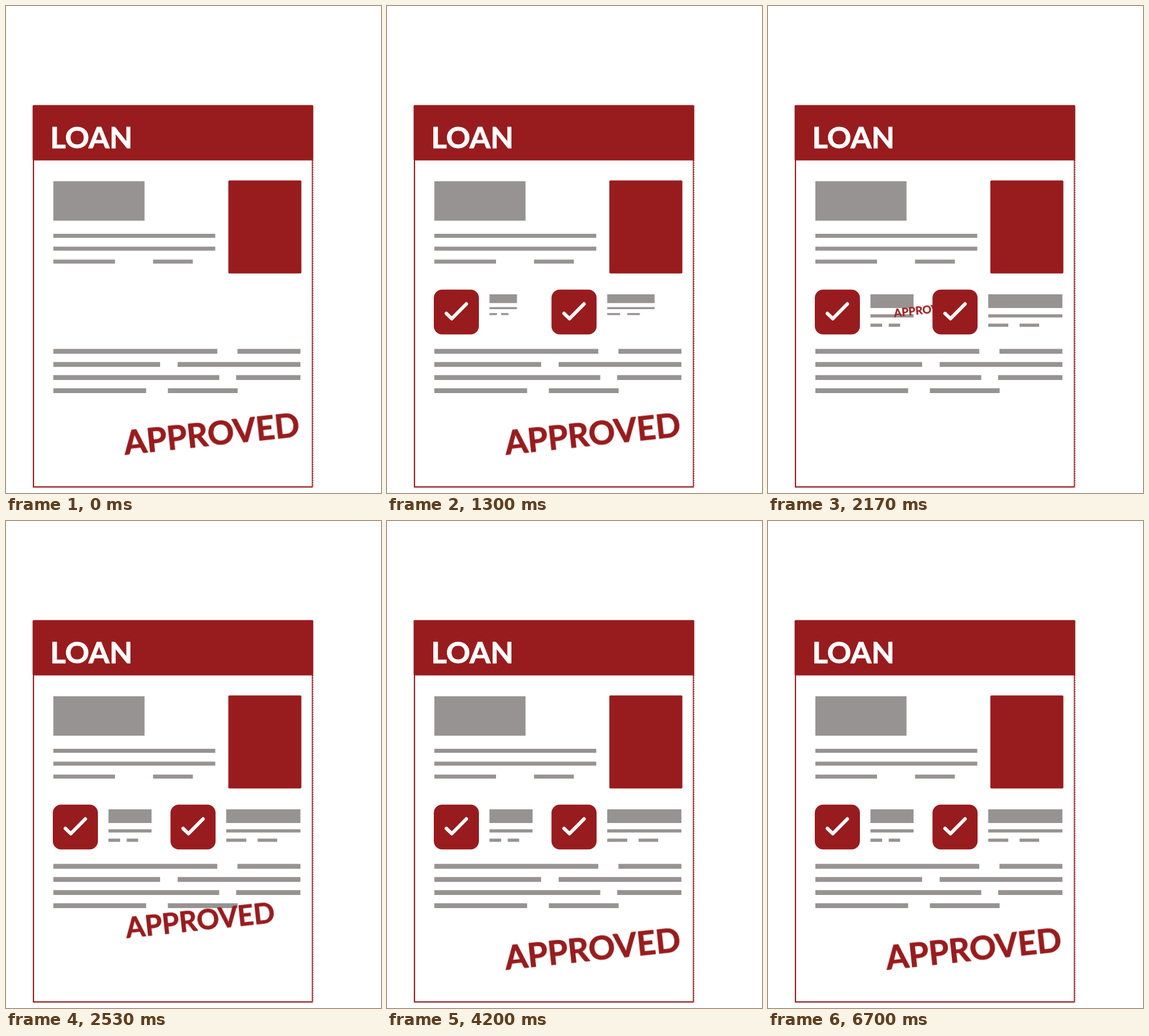
An HTML page that plays this animation: 657 px wide and 853 px high, repeating every 8 s.

```html
<!DOCTYPE html>
<html lang="en">
<head>
<meta charset="utf-8">
<title>Loan approved</title>
<style>
  html, body { margin: 0; width: 100%; height: 100%; overflow: hidden; background: #fff; }
  svg { display: block; width: 100vw; height: 100vh; }
  .red { fill: #981c1e; }
  .grey { fill: #979392; }
  .edge { fill: none; stroke: #981c1e; }
  .tick { fill: none; stroke: #fff; stroke-width: 6; stroke-linecap: round; stroke-linejoin: round; }
  text { font-family: Lato, Carlito, sans-serif; font-weight: 700; stroke-width: 1; stroke-linejoin: round; }
  #title { fill: #fff; stroke: #fff; font-size: 52.5px; }
  #stamp text { fill: #981c1e; stroke: #981c1e; font-size: 57.5px; }
  .pop, #stamp { transform-box: view-box; }
</style>
</head>
<body>
<svg viewBox="0 0 657 853" preserveAspectRatio="none">
  <path class="edge" stroke-width="2.2" d="M48.1 268V842.3H537"/>
  <path class="edge" stroke-width="1.6" d="M536.6 268V843"/>
  <path class="edge" stroke-width="1.2" stroke-dasharray="2 2" d="M538 270V843"/>
  <rect class="red" x="46.6" y="173.5" width="491.8" height="97" rx="2"/>
  <text id="title" x="77.6" y="249">LOAN</text>
  <rect class="red" x="389.5" y="305.5" width="128" height="163" rx="2"/>
  <g id="bars"></g>
  <g id="pops"></g>
  <g id="stamp"><text transform="translate(208.6 786) rotate(-6.05)">APPROVED</text></g>
</svg>
<script>
const LOOP = 8000;
const SMOOTH = 'cubic-bezier(.3333,0,.6667,1)';
const CUBIC_OUT = 'cubic-bezier(.3333,1,.6667,1)';
const $ = id => document.getElementById(id);

function add(parent, tag, attrs) {
  const el = document.createElementNS('http://www.w3.org/2000/svg', tag);
  for (const k in attrs) el.setAttribute(k, attrs[k]);
  return parent.appendChild(el);
}

// One row of grey bars, given as pairs of left and right edges.
function row(parent, y, height, ...ends) {
  for (let i = 0; i < ends.length; i += 2)
    add(parent, 'rect', { class: 'grey', x: ends[i], y, width: ends[i + 1] - ends[i], height });
}

// steps: [time, scale, easing to the next step]
function scale(el, x, y, steps) {
  el.style.transformOrigin = `${x}px ${y}px`;
  el.animate(steps.map(([t, s, easing = 'linear']) =>
    ({ offset: t / LOOP, transform: `scale(${s})`, easing })),
    { duration: LOOP, iterations: Infinity });
}

const pop = (el, x, y, start) => scale(el, x, y, [
  [0, 0], [start, 0, SMOOTH], [start + 500, 1.154, SMOOTH], [start + 833, 1], [LOOP, 1]
]);

function checkbox(x, y, start) {
  const g = add($('pops'), 'g', { class: 'pop' });
  add(g, 'rect', { class: 'red', x: x - 39.5, y: y - 39.2, width: 79, height: 78.4, rx: 14.5 });
  add(g, 'path', { class: 'tick', d: `M${x - 17.5} ${y + 2.5}l9.5 9.2l25.5 -25.9` });
  pop(g, x, y, start);
}

function note(x, width, gap, start) {
  const y = 505, [a, b, c] = gap;
  const g = add($('pops'), 'g', { class: 'pop' });
  row(g, y, 24, x, x + width);
  row(g, y + 35, 5.6, x, x + width);
  row(g, y + 51.3, 5.6, x, x + a, x + b, x + c);
  pop(g, x, y, start);
}

const bars = $('bars');
row(bars, 307, 69, 83, 242.7);
row(bars, 399, 7, 83, 366.6);
row(bars, 421.5, 7, 83, 366.6);
row(bars, 444.2, 7, 83, 191, 257.6, 327.4);
row(bars, 600.6, 8.5, 83, 370.2, 405.5, 515.8);
row(bars, 623.6, 8.5, 83, 270, 300.7, 515.8);
row(bars, 646.5, 8.5, 83, 373.6, 403.2, 515.8);
row(bars, 669.5, 8.5, 83, 245.5, 283.6, 405.8);

checkbox(121.5, 536, 33);
checkbox(327.7, 536, 33);
note(179.5, 75.5, [20.5, 32, 52], 1033);
note(385.8, 130, [35.2, 55, 89.3], 1033);

// The stamp stays from the last round, then drops away and grows back.
scale($('stamp'), 228, 421, [
  [0, 1], [2033, 1], [2033, 0, CUBIC_OUT], [3100, 1], [LOOP, 1]
]);
</script>
</body>
</html>
```
